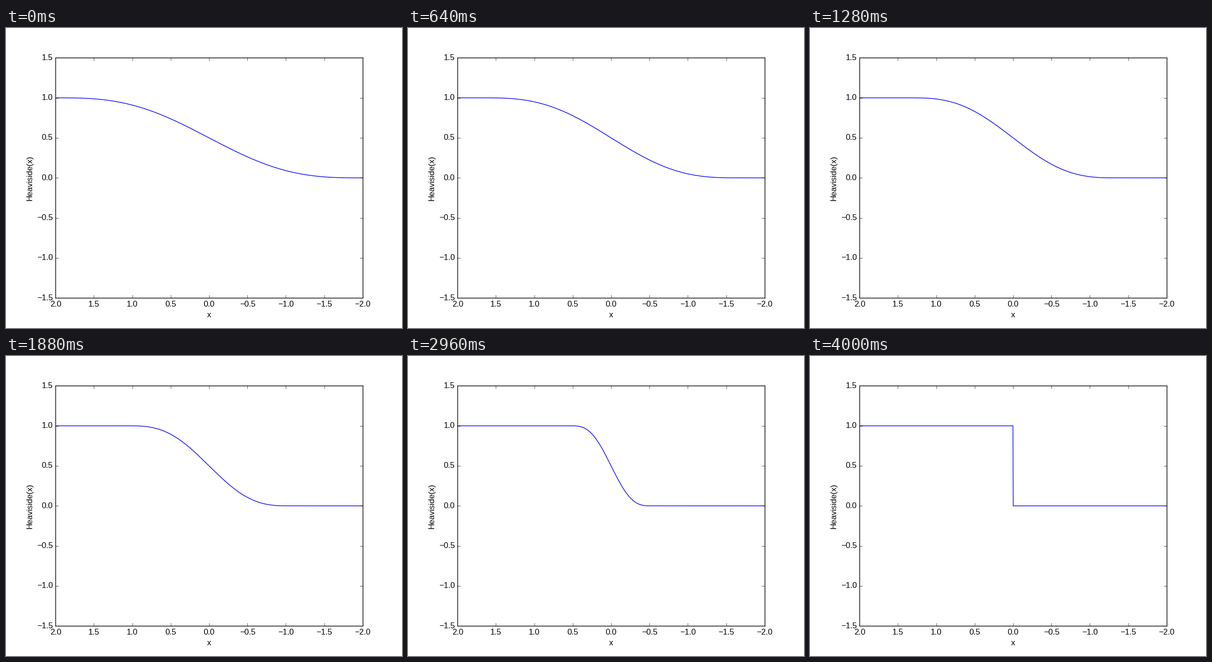
A matplotlib script that plays this animation: 817x617 px, repeating every 4040 ms.

```python
import numpy as np
import matplotlib.pyplot as plt
from matplotlib.animation import FuncAnimation

W, H, DPI = 817, 617, 100
FRAMES, STEP_MS = 101, 40
EPS_START = 2.0

plt.rcParams.update({
    "font.family": "Liberation Sans",
    "font.size": 12,
    "figure.dpi": DPI,
    "savefig.dpi": "figure",
    "axes.linewidth": 1.0,
    "axes.axisbelow": False,
    "axes.unicode_minus": True,
    "ytick.alignment": "center",
})

x = np.linspace(-2, 2, 1000)


def smooth_step(x, eps):
    """Heaviside step smeared over the band -eps..eps."""
    u = np.clip(x / max(eps, 1e-9), -1, 1)
    return 0.5 * (1 + u + np.sin(np.pi * u) / np.pi)


# The tiny margin keeps the pixel size from being truncated.
fig = plt.figure(figsize=((W + 0.001) / DPI, (H + 0.001) / DPI),
                 facecolor="white")

# Lay out on a canvas half a pixel larger, so the frame snaps outwards.
sx, sy = (W + 0.5) / W, (H + 0.5) / H
ax = fig.add_axes([0.125 * sx, 0.1 * sy, 0.775 * sx, 0.8 * sy])
ax.set_xlim(2, -2)
ax.set_ylim(-1.5, 1.5)
ax.set_xticks(np.arange(-4, 5) / 2)
ax.set_yticks(np.arange(-3, 4) / 2)
ax.tick_params(direction="in", top=True, right=True,
               length=4, width=0.5, pad=4)
ax.set_xlabel("x", labelpad=5)
ax.set_ylabel("Heaviside(x)", labelpad=5)
line, = ax.plot(x, smooth_step(x, EPS_START), color="#0000ff", lw=1.0)


def update(i):
    eps = EPS_START * (1 - i / (FRAMES - 1))
    line.set_ydata(smooth_step(x, eps))
    return line,


anim = FuncAnimation(fig, update, frames=FRAMES, interval=STEP_MS,
                     repeat=True, repeat_delay=0, blit=False)
plt.show()
```
